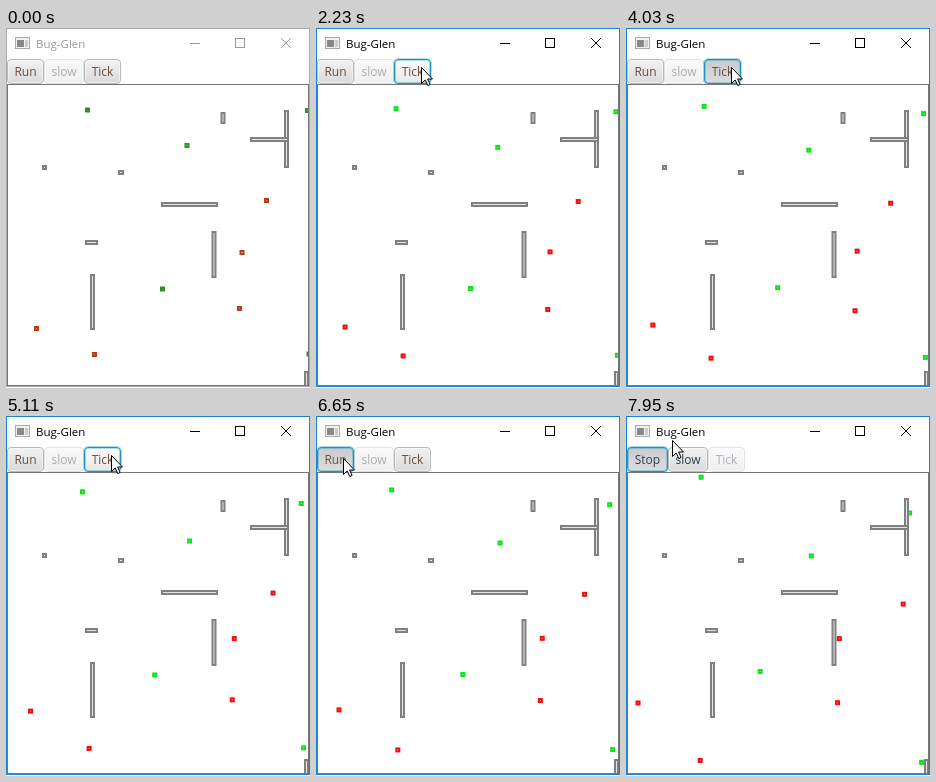
Animation, 304 px wide and 360 px high, one loop 8 s. Source, as an HTML page with a canvas:

```html
<!DOCTYPE html>
<html lang="en">
<head>
<meta charset="utf-8">
<title>Bug-Glen</title>
<style>
  html, body { margin: 0; width: 100%; height: 100%; overflow: hidden; background: #fff; }
  #win {
    position: absolute; left: 0; top: 0; width: 304px; height: 359px; box-sizing: border-box;
    border: 1px solid #aaa; background: #fff; color: #999;
    font: 12px/16px "Open Sans", "Noto Sans", sans-serif;
  }
  #win.active { border-color: #1883d7; color: #000; }
  #title { position: absolute; left: 29px; top: 7px; font-size: 11.5px; }
  #bar { position: absolute; left: 0; top: 30px; height: 25px; display: flex; }
  .btn {
    box-sizing: border-box; width: 37px; line-height: 23px; text-align: center;
    border: 1px solid #b8b8b8; border-radius: 4px; color: #6f4a38;
    background: linear-gradient(#f2f2f2, #dadada); box-shadow: inset 0 0 0 1px #fff8;
  }
  .btn.hover { background: linear-gradient(#fbfbfb, #e8e8e8); }
  .btn.pressed { background: linear-gradient(#c8ccd0, #dcdcdc); }
  .btn.focus { border-color: #1595c0; box-shadow: 0 0 0 1px #1595c055, inset 0 0 0 1px #1595c055; }
  .btn.off { opacity: .4; color: #333; }
  .running .btn { color: #2c3c50; }
  .running #run { width: 41px; }
  #slow { width: 40px; }
  canvas { position: absolute; left: 0; top: 0; }
</style>
</head>
<body>
<div id="win">
  <div id="title">Bug-Glen</div>
  <div id="bar">
    <div class="btn" id="run">Run</div>
    <div class="btn" id="slow">slow</div>
    <div class="btn" id="tick">Tick</div>
  </div>
</div>
<canvas id="stage" width="304" height="360"></canvas>
<script>
const LOOP = 8000, ACTIVE = 834, RUN = 6796, STEP = 96, HOLD = 150;
const [win, run, slow, tick, stage] =
  ['win', 'run', 'slow', 'tick', 'stage'].map(id => document.getElementById(id));
const ctx = stage.getContext('2d');

// Times at which the Tick button is released
const clicks = [1540, 2230, 2620, 3160, 3710, 4100, 4650, 5110, 5570, 5880];

// All walls are 5 thick: left, top, length
const WALL = 5;
const uprights = [[214.5, 84, 12], [84, 246, 56], [205.5, 203, 47], [278, 82, 58], [298, 343, 20]];
const beams = [[36, 137, 5], [112, 142, 6], [155, 174, 57], [79, 212, 13], [244, 109, 39]];

// Each agent walks one pixel per tick: x, y, heading and turn per tick in degrees
const greens = [[81.5, 82, 221, 2.9], [181, 117.5, 67, 1.1], [156.5, 261, 195, -.1],
  [301.5, 82.5, 142, -.1], [303, 326, 143, -3]];
const reds = [[260.5, 172.5, 31, 1.1], [236, 224.5, 198, -1.2], [233.5, 280.5, 151, 1.2],
  [30.5, 300.5, 225, -.8], [88.5, 326.5, 134, -.5]];

// Mouse stops: time, x, y
const mouse = [[680, 124, 0], [990, 111, 27], [1220, 108, 35], [1920, 105, 39], [6010, 105, 39],
  [6570, 27, 42], [6800, 27, 42], [7180, 44, 28], [7410, 46, 24]];

function ticksAt(t) {
  const manual = clicks.filter(c => t >= c).length;
  return manual + Math.max(0, Math.floor((t - RUN) / STEP) + 1);
}

function mouseAt(t) {
  if (t < mouse[0][0]) return null;
  const i = mouse.findIndex(m => m[0] > t);
  if (i < 0) return mouse.at(-1).slice(1);
  const [a, b] = [mouse[i - 1], mouse[i]];
  const k = (t - a[0]) / (b[0] - a[0]);
  return [1, 2].map(j => Math.round(a[j] + (b[j] - a[j]) * k));
}

function walk([x, y, heading, turn], n) {
  for (let i = 0; i < n; i++) {
    const angle = (heading + turn * i) * Math.PI / 180;
    x += Math.cos(angle);
    y += Math.sin(angle);
  }
  return [x, y];
}

function box(x, y, w, h, stroke, fill) {
  ctx.fillStyle = fill;
  ctx.fillRect(x + 1, y + 1, w - 2, h - 2);
  ctx.strokeStyle = stroke;
  ctx.lineWidth = 2;
  ctx.strokeRect(x + 1, y + 1, w - 2, h - 2);
}

function path(...points) {
  ctx.lineWidth = 1;
  ctx.beginPath();
  points.forEach(p => ctx.lineTo(...p));
}

function drawTitleBar(active) {
  ctx.strokeStyle = active ? '#000' : '#999';
  path([184, 15.5], [194, 15.5]);
  ctx.stroke();
  ctx.strokeRect(229.5, 10.5, 9, 9);
  for (const side of [-1, 1]) {
    path([280 - 5 * side, 10], [280 + 5 * side, 20]);
    ctx.stroke();
  }
  ctx.fillStyle = '#f2f2f2';
  ctx.fillRect(9, 9, 15, 12);
  ctx.strokeStyle = '#aaa';
  ctx.strokeRect(9.5, 9.5, 14, 11);
  ctx.fillStyle = '#888';
  ctx.fillRect(11, 12, 7, 7);
  ctx.fillStyle = '#ccc';
  ctx.fillRect(19, 12, 3, 7);
}

function drawWorld(n) {
  ctx.fillStyle = '#fff';
  ctx.fillRect(1, 56, 302, 302);
  ctx.save();
  ctx.beginPath();
  ctx.rect(1, 56, 302, 302);
  ctx.clip();
  const drawAgents = (agents, stroke, fill) => agents.forEach(agent => {
    const [x, y] = walk(agent, n);
    box(x - 2.5, y - 2.5, 5, 5, stroke, fill);
  });
  drawAgents(greens, n ? '#0be31b' : '#2b9424', n ? '#9f9' : '#7b7');
  drawAgents(reds, n ? '#f20d0d' : '#b83c18', n ? '#faa' : '#d97');
  uprights.forEach(([x, y, length]) => box(x, y, WALL, length, '#808080', '#e4e4e4'));
  beams.forEach(([x, y, length]) => box(x, y, length, WALL, '#808080', '#e4e4e4'));
  ctx.restore();
  ctx.strokeStyle = '#777';
  ctx.lineWidth = 1;
  ctx.strokeRect(1.5, 56.5, 301, 301);
}

function drawMouse([x, y]) {
  ctx.save();
  ctx.translate(x + .5, y + .5);
  path([0, 0], [0, 16], [3.7, 12.5], [6.3, 18], [8.6, 17], [6.1, 11.5], [11, 11.5]);
  ctx.closePath();
  ctx.fillStyle = '#fff';
  ctx.fill();
  ctx.strokeStyle = '#000';
  ctx.stroke();
  ctx.restore();
}

function setButtons(t, pos) {
  const running = t >= RUN, runDown = t >= RUN - HOLD;
  const over = (left, right) => !!pos && pos[1] >= 31 && pos[0] >= left && pos[0] < right;
  const set = (el, states) =>
    Object.entries(states).forEach(([name, on]) => el.classList.toggle(name, on));
  set(win, { active: t >= ACTIVE, running });
  run.textContent = running ? 'Stop' : 'Run';
  set(run, { hover: over(1, 38), focus: runDown, pressed: runDown });
  set(slow, { off: !running, hover: running && over(42, 82) });
  set(tick, {
    off: running,
    hover: !running && over(78, 115),
    focus: t >= clicks[0] && !runDown,
    pressed: clicks.some(c => t >= c - HOLD && t < c)
  });
}

function draw(t) {
  const pos = mouseAt(t);
  setButtons(t, pos);
  ctx.clearRect(0, 0, 304, 360);
  drawTitleBar(t >= ACTIVE);
  drawWorld(ticksAt(t));
  if (pos) drawMouse(pos);
}

let start;
function frame(now) {
  start ??= now;
  draw((now - start) % LOOP);
  requestAnimationFrame(frame);
}
draw(0);
requestAnimationFrame(frame);
</script>
</body>
</html>
```
